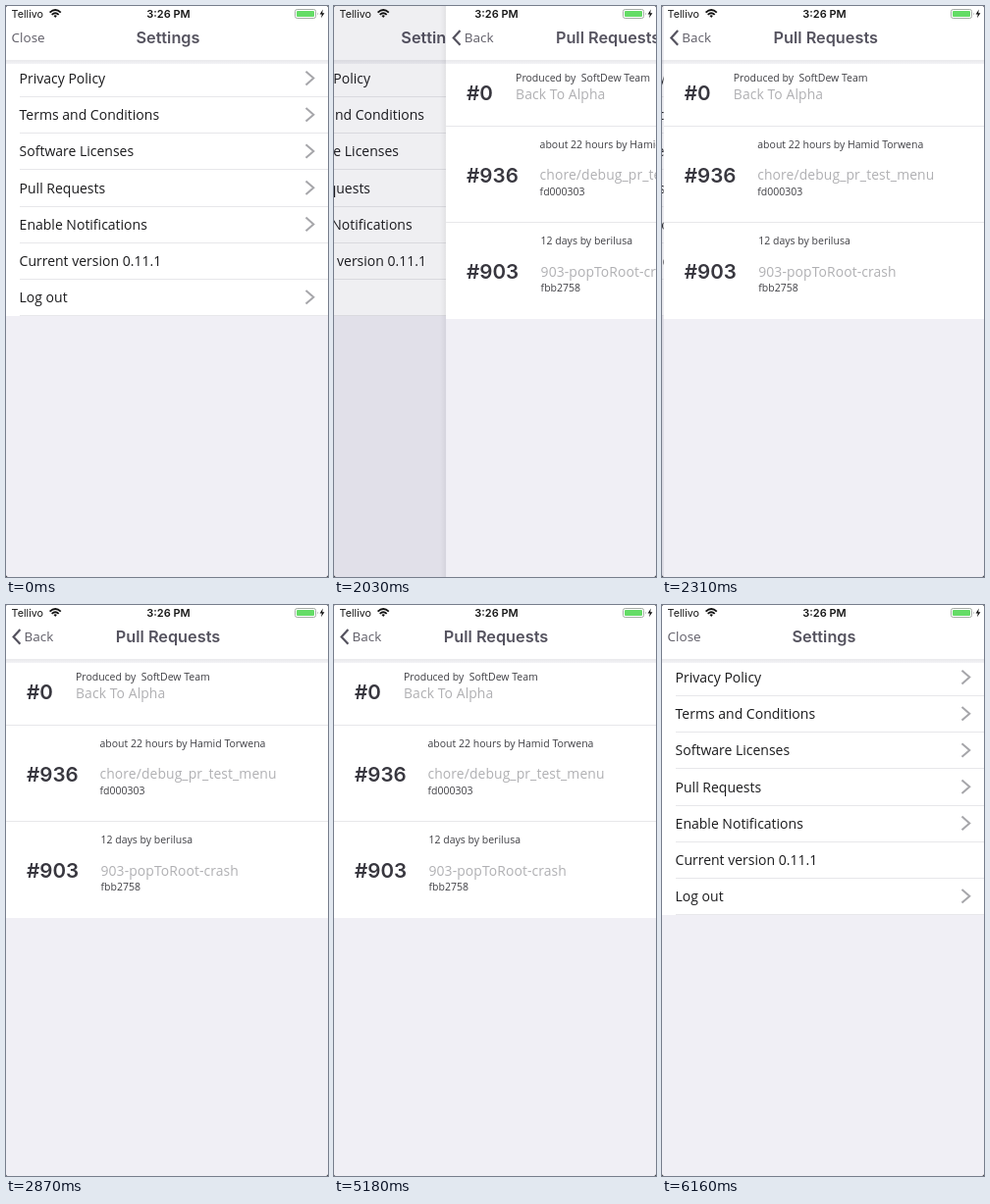
Recreate the animation shown at these times as an HTML page. Size 328 by 582 pixels, loop 6230 ms.

```html
<!DOCTYPE html>
<html lang="en">
<head>
<meta charset="utf-8">
<title>Settings navigation</title>
<style>
  html, body { margin: 0; width: 100%; height: 100%; overflow: hidden; background: #000; }
  svg { display: block; width: 328px; height: 582px; border-radius: 2px; }
  text { font-family: "Open Sans", "Noto Sans", sans-serif; white-space: pre; }
  .bold { font-family: Inter, sans-serif; font-weight: 600; }
  .title { font-size: 16.3px; fill: #55535f; text-anchor: middle; }
  .button { font-size: 13.5px; fill: #5f5d67; }
  .row { font-size: 14px; fill: #1b1b1d; }
  .number { font-size: 20.6px; fill: #38373f; }
  .small { font-size: 10.5px; fill: #3f3f44; }
  .branch { font-size: 13.9px; letter-spacing: .1px; fill: #b0b0b3; }
  .status { font-family: Inter, sans-serif; font-size: 10.8px; fill: #161616; }
  .time { font-size: 11px; font-weight: 600; text-anchor: middle; }
  .line { stroke: #e7e7ea; stroke-width: 1; }
  .chevron { fill: none; stroke: #a6a6aa; stroke-width: 2; }
  .back { stroke: #55535f; stroke-width: 2.2; }
</style>
</head>
<body>
<svg id="stage" viewBox="0 0 328 582">
  <defs>
    <linearGradient id="band" x2="0" y2="1">
      <stop stop-color="#e9e9ec"/><stop offset="1" stop-color="#f3f3f6"/>
    </linearGradient>
    <linearGradient id="edge">
      <stop stop-opacity="0"/><stop offset="1" stop-opacity=".06"/>
    </linearGradient>
  </defs>
  <g id="settings"></g>
  <rect id="dim" width="328" height="582" fill="#1c1c40" opacity="0"/>
  <g id="requests"></g>
  <g id="status">
    <text class="status" x="5.5" y="11.6">Tellivo</text>
    <g fill="none" stroke="#111" stroke-width="1.9">
      <path d="M44.6 6.6Q50.2 1.6 55.8 6.6M46.7 8.9Q50.2 5.8 53.7 8.9"/>
      <path d="M48.5 9.9Q50.2 8.6 51.9 9.9L50.2 12Z" fill="#111" stroke="none"/>
    </g>
    <text class="status time" x="165.5" y="11.7">3:26 PM</text>
    <rect x="294.5" y="3.5" width="21" height="9" rx="2" fill="#fff" stroke="#8f9a90" stroke-width=".8"/>
    <rect x="296" y="5" width="18" height="6" rx="1" fill="#64dc66"/>
    <path d="M317 6.5q1.4 1.5 0 3z" fill="#8f9a90"/>
    <path d="M322.8 3.6L319.6 8.5H321.8L321 12.2L324.4 7.2H322.2Z" fill="#111"/>
  </g>
</svg>
<script>
  const LOOP = 6230, STEP = 70, WIDTH = 328;
  const PUSH = 1908, POP = 5186;
  const STIFFNESS = 18.26; // natural frequency of the spring, per second

  const $ = id => document.getElementById(id);
  const text = (cls, x, y, value) => `<text class="${cls}" x="${x}" y="${y}">${value}</text>`;
  const line = (x, y) => `<path class="line" d="M${x} ${y}H328"/>`;

  const page = (title, bottom, content) => `
    <rect width="328" height="582" fill="#f0eff5"/>
    <rect width="328" height="55" fill="#fff"/>
    <rect y="55" width="328" height="4" fill="url(#band)"/>
    <rect y="59" width="328" height="${bottom - 59}" fill="#fff"/>
    ${text('bold title', 165, 38, title)}${content}`;

  const rows = ['Privacy Policy', 'Terms and Conditions', 'Software Licenses', 'Pull Requests',
    'Enable Notifications', 'Current version 0.11.1', 'Log out'];

  const settingsRow = (label, i) => {
    const y = 37.2 * i;
    const arrow = label.startsWith('Current') ? ''
      : `<path class="chevron" d="M305.5 ${y + 66.8}L313.3 ${y + 73.6}L305.5 ${y + 80.4}"/>`;
    return text('row', 13.6, y + 79, label) + arrow + line(14, Math.round(y + 92) + .5);
  };

  $('settings').innerHTML = page('Settings', 316,
    text('button', 5.6, 37, 'Close') + rows.map(settingsRow).join(''));

  const request = (number, y, x, author, authorY, branch, branchY, hash) =>
    text('bold number', 21, y, number) +
    text('small', x, authorY, author) +
    text('branch', x, branchY, branch) +
    (hash ? text('small', x, branchY + 15.5, hash) : '');

  $('requests').innerHTML =
    '<rect x="-6" width="6" height="582" fill="url(#edge)" id="shadow"/>' +
    page('Pull Requests', 319,
      '<path class="chevron back" d="M14.4 25L7.6 32.4L14.4 39.8"/>' +
      text('button', 18.6, 36.8, 'Back') +
      request('#0', 96, 71, 'Produced by  SoftDew Team', 77, 'Back To Alpha', 95.3) +
      request('#936', 179.5, 95.5, 'about 22 hours by Hamid Torwena', 144.5,
        'chore/debug_pr_test_menu', 177.3, 'fd000303') +
      request('#903', 277.5, 96.5, '12 days by berilusa', 243,
        '903-popToRoot-crash', 275.6, 'fbb2758') +
      line(0, 122.5) + line(0, 220.5));

  // Critically damped spring from 0 to 1.
  const spring = ms => {
    const s = Math.max(0, ms) / 1000 * STIFFNESS;
    return 1 - (1 + s) * Math.exp(-s);
  };

  function draw(now) {
    const t = Math.floor(now % LOOP / STEP) * STEP;
    const open = t < POP ? spring(t - PUSH) : 1 - spring(t - POP);
    $('requests').setAttribute('transform', `translate(${WIDTH * (1 - open)})`);
    $('settings').setAttribute('transform', `translate(${-.3 * WIDTH * open})`);
    $('dim').setAttribute('opacity', .1 * open);
    $('shadow').setAttribute('opacity', 4 * open * (1 - open));
  }

  const start = performance.now();
  function tick() {
    draw(performance.now() - start);
    requestAnimationFrame(tick);
  }
  tick();
</script>
</body>
</html>
```
